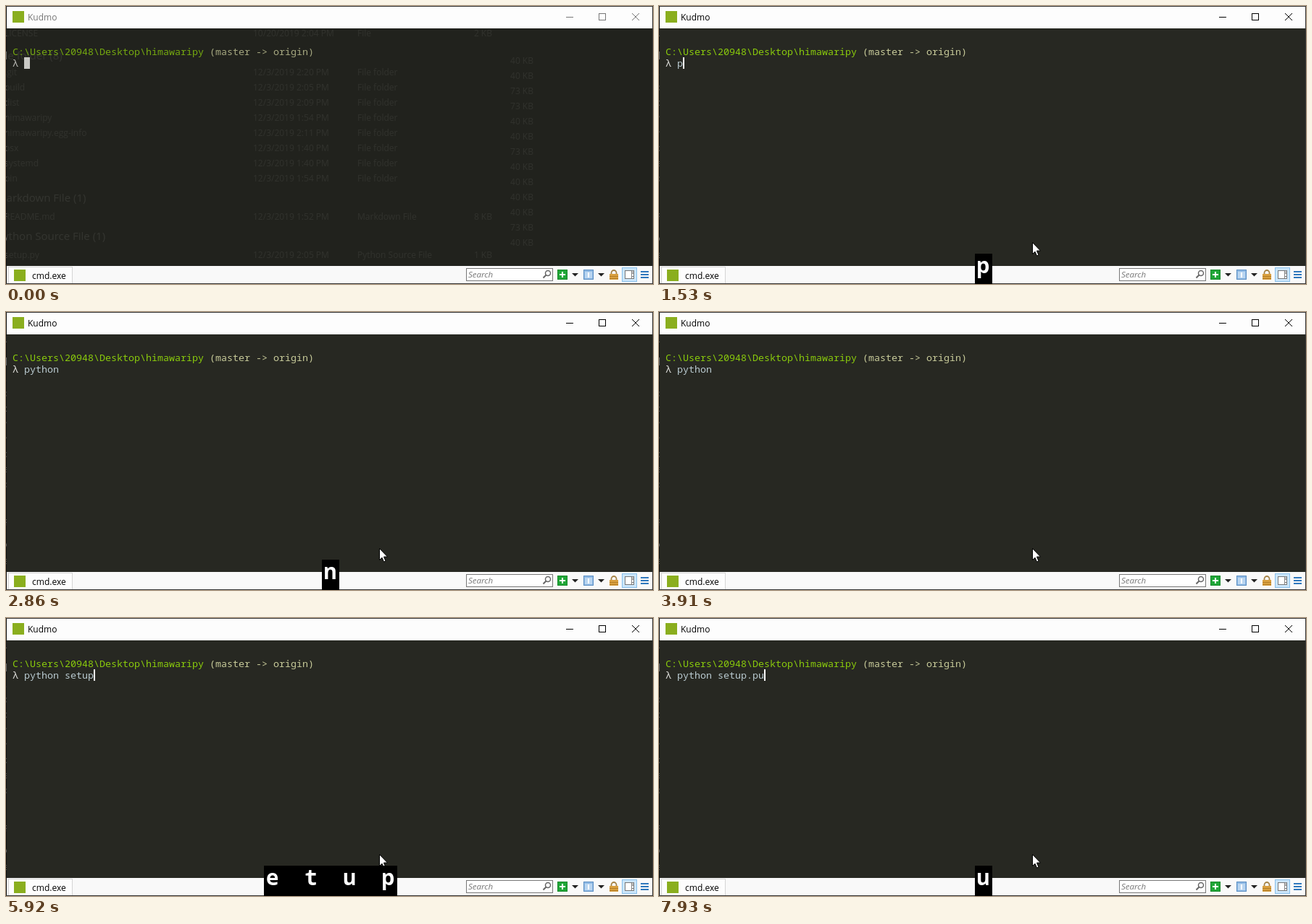
Recreate the animation shown at these times as an HTML page with a canvas. Size 893 by 385 pixels, loop 8000 ms.

```html
<!DOCTYPE html>
<html lang="en">
<head>
<meta charset="utf-8">
<title>Terminal typing</title>
<style>
  html, body { margin: 0; width: 100%; height: 100%; overflow: hidden; background: #000; }
  canvas { display: block; }
</style>
</head>
<body>
<canvas id="stage" width="893" height="385"></canvas>
<script>
const ctx = document.getElementById('stage').getContext('2d');
const LOOP = 8000, FOCUS = 290;
const UI = '"Open Sans", "Noto Sans", sans-serif';
const MONO = '"Noto Sans Mono", "DejaVu Sans Mono", monospace';

// Each key: text on the line, time typed, caption on, caption off, caption label
const keys = [
  ['p', 1470, 1530, 2560], ['y', 1660, 1720, 2630], ['t', 1780, 1850, 2690],
  ['h', 1850, 1910, 2690], ['o', 1980, 2040, 2860], ['n', 2290, 2290, 2990],
  [' ', 2990, 2990, 3910, 'Space'],
  ['s', 5040, 5100, 5920], ['e', 5160, 5230, 6100], ['t', 5290, 5350, 6170],
  ['u', 5730, 5790, 6670], ['p', 5790, 5850, 6740],
  ['.', 6670, 6740, 7610], ['p', 6990, 7060, 7930], ['u', 7560, 7610, LOOP]
].map(([char, typed, on, off, label = char]) => ({ char, typed, on, off, label }));

// Spans in which the bar cursor is hidden
const blinks = [[800, 1350], [2860, 2990], [3550, 4030], [4590, 5040], [6420, 6670]];

const folders = [
  ['.git', '2:20'], ['build', '2:05'], ['dist', '2:09'], ['himawaripy', '1:54'],
  ['himawaripy.egg-info', '2:11'], ['osx', '1:40'], ['systemd', '1:40'], ['bin', '1:54']
];

function rect(x, y, w, h, color) {
  ctx.fillStyle = color;
  ctx.fillRect(x, y, w, h);
}

function frame(x, y, w, h, color) {
  ctx.strokeStyle = color;
  ctx.lineWidth = 1;
  ctx.strokeRect(x + .5, y + .5, w - 1, h - 1);
}

function text(str, x, y, font, color, align = 'left') {
  ctx.font = font;
  ctx.fillStyle = color;
  ctx.textAlign = align;
  ctx.fillText(str, x, y);
}

function line(points, color, width = 1) {
  ctx.strokeStyle = color;
  ctx.lineWidth = width;
  ctx.beginPath();
  points.forEach(([x, y]) => ctx.lineTo(x, y));
  ctx.stroke();
}

function polygon(points, color) {
  ctx.fillStyle = color;
  ctx.beginPath();
  points.forEach(([x, y]) => ctx.lineTo(x, y));
  ctx.closePath();
  ctx.fill();
}

function drawFileList() {
  const font = '12px ' + UI, color = '#565656';
  const row = (y, name, date, type, size = '') => {
    text(name, -2, y, font, color);
    text(date + ' PM', 341, y, font, color);
    text(type, 485, y, font, color);
    text(size, 671, y, font, color, 'right');
  };
  const heading = (str, y) => text(str, -13, y, '15px ' + UI, '#666');
  row(42, 'LICENSE', '10/20/2019 2:04', 'File', '2 KB');
  heading('File folder (8)', 74);
  folders.forEach(([name, time], i) => row(96 + i * 21, name, '12/3/2019 ' + time, 'File folder'));
  heading('Markdown File (1)', 271);
  row(296, 'README.md', '12/3/2019 1:52', 'Markdown File', '8 KB');
  heading('Python Source File (1)', 324);
  row(349, 'setup.py', '12/3/2019 2:05', 'Python Source File', '1 KB');
  for (let i = 0; i < 13; i++) {
    text([2, 3, 6, 11].includes(i) ? '73 KB' : '40 KB', 728, 80 + i * 21, font, color, 'right');
  }
}

function drawTitleBar(active) {
  const ink = active ? '#000' : '#777';
  rect(1, 1, 891, 30, '#fdfdfd');
  rect(9, 7, 16, 16, '#8aae1e');
  text('Kudmo', 30, 20, '12px ' + UI, ink);
  line([[773, 15.5], [783, 15.5]], ink);
  frame(818, 10, 10, 10, ink);
  line([[864, 10], [874, 20]], ink);
  line([[874, 10], [864, 20]], ink);
}

function drawStatusBar() {
  rect(1, 360, 891, 24, '#f9f9f9');
  rect(3, 361, 89, 23, '#fdfdfd');
  frame(3, 361, 89, 24, '#d5d5d5');
  rect(11, 365, 16, 16, '#8aae1e');
  text('cmd.exe', 36, 378, '12px ' + UI, '#000');

  rect(635, 363, 120, 18, '#fff');
  frame(635, 363, 120, 18, '#777');
  text('Search', 638, 376, 'italic 11.5px ' + UI, '#777');
  ctx.beginPath();
  ctx.arc(748, 370, 3.5, 0, 7);
  ctx.strokeStyle = '#666';
  ctx.lineWidth = 1.5;
  ctx.stroke();
  line([[745.5, 372.5], [741.5, 376.5]], '#666', 2);

  rect(761, 365, 14, 14, '#1fa637');
  frame(761, 365, 14, 14, '#168a2b');
  rect(767, 368, 2, 8, '#fff');
  rect(764, 371, 8, 2, '#fff');
  for (const x of [781, 817]) polygon([[x, 370], [x + 9, 370], [x + 4.5, 374.5]], '#222');

  rect(797, 365, 14, 14, '#8fb9e4');
  frame(797, 365, 14, 14, '#5c8fc4');
  rect(799, 368, 10, 9, '#b9d5f0');
  rect(803, 369, 2, 7, '#fff');

  ctx.beginPath();
  ctx.arc(839, 369.5, 3.5, Math.PI, 0);
  ctx.lineTo(842.5, 373);
  ctx.moveTo(835.5, 369.5);
  ctx.lineTo(835.5, 373);
  ctx.strokeStyle = '#a58346';
  ctx.lineWidth = 1.8;
  ctx.stroke();
  rect(833, 371, 12, 8, '#d9a03f');
  rect(833, 374, 12, 1, '#b37d27');
  rect(833, 377, 12, 1, '#b37d27');

  rect(850, 362, 21, 20, '#cce6fa');
  frame(850, 362, 21, 20, '#88c0ec');
  rect(854, 366, 13, 12, '#fff');
  frame(854, 366, 13, 12, '#777');
  rect(863, 367, 1, 10, '#888');
  for (const y of [368, 370, 374]) rect(864, y, 2, 1, '#777');
  for (const y of [367, 371, 375]) rect(876, y, 11, 2, '#2f78bd');
}

function drawConsole(t, active) {
  const font = '13.333px ' + MONO;
  const typed = keys.filter(k => t >= k.typed).map(k => k.char).join('');
  ctx.globalAlpha = active ? 1 : .8;
  rect(1, 31, 891, 329, '#272822');
  text('C:\\Users\\20948\\Desktop\\himawaripy', 9, 68, font, '#8acb0c');
  text('(master -> origin)', 281, 68, font, '#c8cb9a');
  text('λ', 9, 84, font, '#dededa');
  text(typed, 25, 84, font, '#b9cad0');
  ctx.globalAlpha = 1;
  if (!active) rect(25, 71, 8, 16, '#c9c9c5');
  else if (!blinks.some(([from, to]) => t >= from && t < to)) {
    rect(25 + typed.length * 8, 71, 2, 16, '#fff');
  }
}

function drawPointer(t) {
  if (t < 50) return;
  const left = (1 - Math.min(1, (t - 50) / (FOCUS - 50))) ** 2;
  ctx.save();
  ctx.translate(515 + 185 * left, 327 + 62 * left);
  const arrow = [[.5, .5], [.5, 16.5], [4, 13.2], [6.5, 19], [9, 18], [6.5, 12], [11.5, 12]];
  polygon(arrow, '#fff');
  line([...arrow, arrow[0]], '#000');
  ctx.restore();
}

function drawCaption(t) {
  const label = keys.filter(k => t >= k.on && t < k.off).map(k => k.label).join('  ');
  if (!label) return;
  ctx.font = '600 29.6px ' + MONO;
  const width = Math.round(ctx.measureText(label).width + 6);
  rect(Math.round(447.5 - width / 2), 343, width, 42, '#000');
  text(label, 447.5, 370, ctx.font, '#fff', 'center');
}

function draw() {
  const t = performance.now() % LOOP;
  const active = t >= FOCUS;
  rect(0, 0, 893, 385, '#0c0c0c');
  drawFileList();
  drawConsole(t, active);
  drawTitleBar(active);
  drawStatusBar();
  frame(0, 0, 893, 1, '#333');
  rect(892, 0, 1, 385, '#333');
  rect(0, 384, 893, 1, '#333');
  drawPointer(t);
  drawCaption(t);
  requestAnimationFrame(draw);
}
draw();
</script>
</body>
</html>
```
